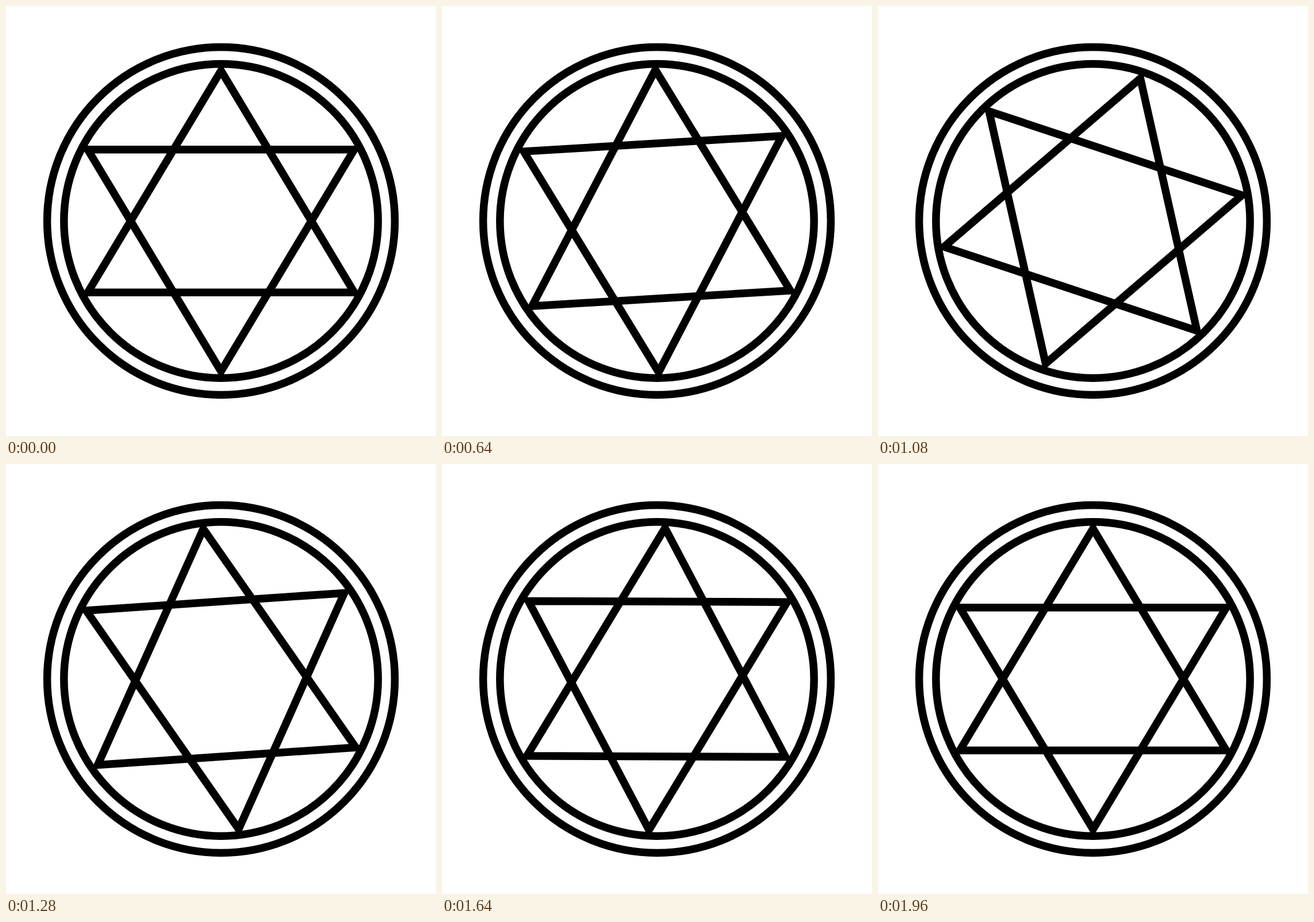
Animation of 748 by 748 pixels, one loop 2 s. Source, as an HTML page:

```html
<!DOCTYPE html>
<html lang="en">
<head>
<meta charset="utf-8">
<title>Turning hexagram</title>
<style>
  html, body { margin: 0; width: 100%; height: 100%; overflow: hidden; background: #fff; }
  svg { display: block; width: 100%; height: 100%; }
</style>
</head>
<body>
<svg viewBox="0 0 748 748">
  <g transform="translate(374 374)" fill="none" stroke="#000" stroke-width="13.5">
    <circle r="302.4"/>
    <circle r="273.2"/>
    <g id="star">
      <path d="M0-261.5L231.8 124.2H-231.8Z"/>
      <path d="M0 261.5L231.8-124.2H-231.8Z"/>
    </g>
  </g>
</svg>
<script>
  const LOOP = 2000, STEP = 40;
  const LAST_STEP = LOOP / STEP - 1;
  const star = document.getElementById('star');
  const start = performance.now();

  // One full turn; the final step repeats the starting pose.
  function draw(time) {
    const step = Math.floor((time % LOOP) / STEP);
    star.setAttribute('transform', `rotate(${360 * step / LAST_STEP})`);
  }

  function tick(now) {
    draw(Math.max(0, now - start));
    requestAnimationFrame(tick);
  }

  draw(0);
  requestAnimationFrame(tick);
</script>
</body>
</html>
```
